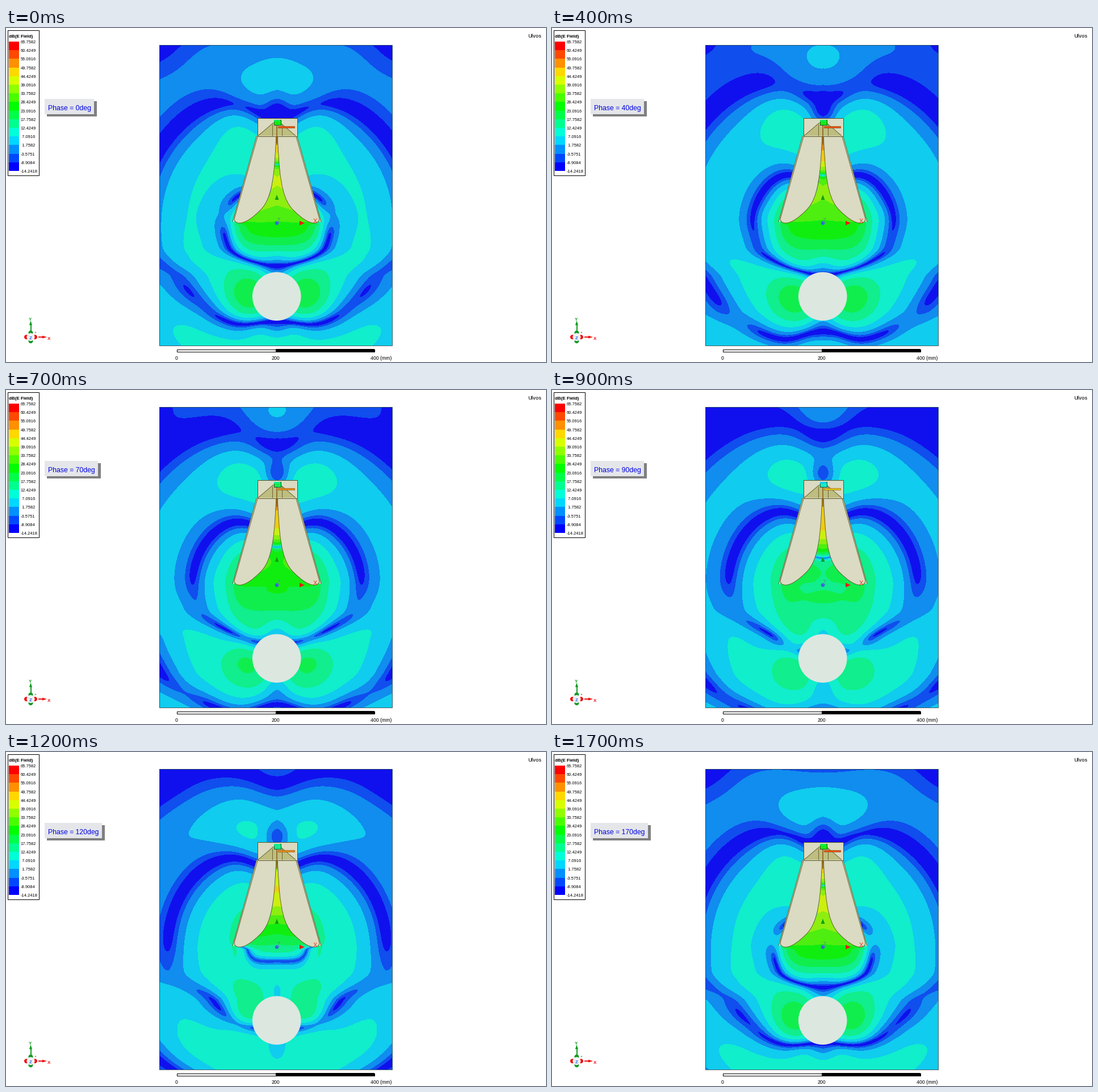
These frames come from a looping animation (951 by 589 pixels, 1800 ms). A matplotlib script:

```python
import numpy as np
import matplotlib.pyplot as plt
from matplotlib.animation import FuncAnimation
from matplotlib.patches import Circle, PathPatch, Polygon, Rectangle
from matplotlib.path import Path

W, H, DPI = 951, 589, 100
CX = 477                      # symmetry axis of the antenna
MOUTH = 340                   # height of the radiating mouth
BALL_Y, BALL_R = 473.3, 42.8
LEFT, RIGHT, TOP, BOTTOM = 270, 680, 30, 559
FRAMES, STEP = 18, 10         # phase step in degrees
V_MAX, V_STEP = 65.75823, 16 / 3
V_MIN = V_MAX - 15 * V_STEP

# Stepped rainbow, lowest level first.
k = np.arange(15)
BANDS = np.clip(72 * np.column_stack([k - 7, np.minimum(k, 14 - k), 7 - k]),
                0, 255)
SHADED = (16 + BANDS * 222 / 255).astype(np.uint8)

u, y = np.meshgrid(np.abs(np.arange(LEFT, RIGHT) - CX).astype(float),
                   np.arange(TOP, BOTTOM + 1.0))


def bump(u0, y0, su, sy):
    return np.exp(-((u - u0) / su) ** 2 / 2 - ((y - y0) / sy) ** 2 / 2)


def ramp(start, width):
    t = np.clip((y - start) / width, 0, 1)
    return t * t * (3 - 2 * t)


def zero_phase():
    """Phase at which the field passes through zero."""
    flat_u = u * (1 - np.exp(-(u / 60) ** 2))     # flat fronts in the mouth
    r = np.sqrt(flat_u ** 2 + (y - MOUTH) ** 2 + 30 ** 2)
    behind = np.tanh(np.maximum(MOUTH - y, 0) / 60)
    delay = 70 * behind * np.exp(-(u / 85) ** 2)
    delay += 52 * ramp(385 + 20 * np.exp(-(u / 40) ** 2), 55)
    delay += 35 * np.exp(-(u / 55) ** 2) * ramp(490, 50)
    delay += .3 * np.maximum(y - 500, 0)
    return 71 + 1.18 * r + delay


def peak_level():
    """Highest level in dB over one cycle."""
    r = np.sqrt(u ** 2 + (y - MOUTH) ** 2 + 30 ** 2)
    db = 16.5 - .058 * r + .045 * np.maximum(y - 400, 0)
    db += 13 * np.exp(-(u / 80) ** 6 - ((y - 345) / 48) ** 2)
    db += 5 * bump(65, 150, 40, 40) - 13 * bump(0, 148, 14, 16)  # back lobes
    db += 4 * bump(0, 35, 30, 30) - 5 * bump(210, 30, 35, 35)
    db += 11 * bump(52, 472, 28, 30)                             # ball sides
    return db - 7 * bump(0, 428, 18, 18) - 7 * bump(0, 522, 16, 16)


def null_fill():
    """Elliptic polarisation leaves a remainder in the nulls."""
    return (.0008 + .18 * bump(172, 396, 28, 28) + .1 * bump(62, 85, 25, 28)
            + .1 * bump(92, 332, 12, 12) + .1 * bump(155, 515, 22, 22)
            + .03 * bump(70, 458, 16, 16))


def blend_slot(peak, null, fill):
    """Inside the tapered slot the wave runs down along the axis."""
    inside = u < 4 + 65 * np.exp((y - 344) / 26)
    mix = np.clip((348 - y) / 12, 0, 1) * (inside & (y > 185))
    slot_peak = 54 - .165 * (y - .35 * u - 190)
    slot_null = 20 + 85 * np.tanh((y + .2 * u - 250) / 40)
    return (peak + mix * (slot_peak - peak), null + mix * (slot_null - null),
            fill + mix * (.0001 - fill))


PEAK, NULL, FILL = blend_slot(peak_level(), zero_phase(), null_fill())


def level(phase, top, zero, floor):
    s = np.sin(np.radians(phase - zero))
    return top + 10 * np.log10(s * s + floor)


def shade(db):
    return SHADED[np.clip(np.floor((db - V_MIN) / V_STEP), 0, 14).astype(int)]


def field(phase):
    return shade(level(phase, PEAK, NULL, FILL))


fig = plt.figure(figsize=(W / DPI, H / DPI), dpi=DPI, facecolor="white")
ax = fig.add_axes([0, 0, 1, 1])


def label(x, y, text, px, color="black", **kw):
    return ax.text(x, y, text, fontsize=px * 72 / DPI, color=color,
                   family="Liberation Sans", zorder=9, **kw)


def rect(x0, y0, x1, y1, fc, ec="none", lw=.72, z=3):
    return ax.add_patch(Rectangle((x0, y0), x1 - x0, y1 - y0, fc=fc, ec=ec,
                                  lw=lw, zorder=z))


def line(xs, ys, color, lw=.72, z=5):
    ax.plot(xs, ys, color=color, lw=lw, zorder=z, solid_capstyle="butt")


def dot(x, y, r, color, z=7):
    ax.add_patch(Circle((x, y), r, fc=color, ec="none", zorder=z))


def poly(pts, fc, z=7):
    ax.add_patch(Polygon(pts, fc=fc, ec="none", zorder=z))


def draw_legend():
    rect(2.5, 3.5, 57.5, 259.5, "white", "black")
    label(5, 17, "dB(E Field)", 8, weight="bold")
    for i in range(16):
        y0 = 24 + 15.2 * i
        if i < 15:
            rect(5, y0, 23, y0 + 15.2, BANDS[14 - i] / 255, z=4)
        label(25.5, y0 + 3, f"{V_MAX - i * V_STEP:7.4f}", 7.5)


def draw_antenna():
    body, dark, edge = "#dadbc2", "#bebe80", "#5a5423"
    codes = [Path.MOVETO] + [Path.CURVE4] * 9 + [Path.LINETO, Path.CLOSEPOLY]
    half = np.array([(1.2, 190), (4, 250), (6, 300), (30, 322), (42, 334),
                     (55, 344), (66, 344), (71, 344), (76, 341), (74.5, 335),
                     (33.5, 190), (1.2, 190)])
    for s in (-1, 1):
        poly([(CX + s * a, b) for a, b in
              ((33, 190), (35.5, 190), (78, 342), (75, 342))], body, 4)
        outline = np.column_stack([CX + s * half[:, 0], half[:, 1]])
        ax.add_patch(PathPatch(Path(outline, codes), fc=body, ec=edge,
                               lw=.6, zorder=5))
        line([CX + s * 35.5, CX + s * 78], [190, 342], edge, .6)
    rect(442.5, 158.5, 512.5, 190.5, body, edge, z=5)
    poly([(444, 190), (471, 167), (483, 167), (510, 190)], dark, 5)
    line([444, 471], [190, 167], edge, .6, 6)
    line([483, 510], [167, 190], edge, .6, 6)
    for x in (468.5, 485.5):
        line([x, x], [170, 190], edge, .6, 6)
    line([476.5, 476.5], [171, 206], "#8a5a14", 1.1, 6)


def draw_axes_marks():
    dot(477, 344, 3.3, "#3c64dc")
    label(477, 343, "Z", 10, "#5a8c8c")
    poly([(477, 294), (473.5, 303), (480.5, 303)], "#12a012")
    poly([(526, 344), (517, 340), (517, 348)], "#e61e14")
    label(541, 344, "X", 11, "#e63c1e")

    green, red = "#109a20", "#f01414"
    line([43.5, 43.5], [537, 522], green, 1.4)
    poly([(43.5, 516), (41, 524), (46, 524)], green)
    for y0 in (537.5, 552):
        dot(43.5, y0, 4, green)
    for x0 in (36, 51):
        dot(x0, 545, 4, red)
    line([57, 66], [545, 545], red, 1.4)
    poly([(72, 545), (64, 542.5), (64, 547.5)], red)
    dot(43.5, 545, 7, "#eef2f4", 8)
    dot(52, 537, 1.3, "#9aa89a", 8)
    label(43.3, 549, "Z", 8, "#2864e6", ha="center", weight="bold")
    label(43, 516, "Y", 8, green, ha="center", weight="bold")
    label(76, 549.5, "X", 8, red, ha="center", weight="bold")


def draw_scale():
    rect(300.5, 566.5, 648.5, 570.5, "white", "black")
    rect(475, 566, 649, 571, "black", z=4)
    for x, text in ((300.5, "0"), (474.5, "200"), (660.5, "400 (mm)")):
        label(x, 585, text, 8.8, ha="center")


image = ax.imshow(field(0), extent=(LEFT, RIGHT, BOTTOM + 1, TOP),
                  interpolation="nearest", zorder=1)
rect(LEFT - .5, TOP - .5, RIGHT - .5, BOTTOM + .5, "none", "#1e4650", .6, 2)
draw_legend()
draw_antenna()
dot(CX - .3, BALL_Y, BALL_R, "#dce7e0", 5)
draw_axes_marks()
draw_scale()
label(943, 17, "Ulvos", 8.8, "#3c3c3c", weight="bold", ha="right")

feed = rect(471.5, 161.5, 483.5, 170.5, "lime", "#285028", z=7)
feed_top = rect(472, 162, 483, 164.5, "lime", z=8)
probe = rect(478.5, 172.5, 507.5, 175.5, "red", "#8c5a1e", .5, 7)
shadow = rect(72, 129, 160, 156, "#808080", z=3)
plate = rect(68, 125, 156, 152, "#e4e6ea", z=4)
caption = label(73.5, 145, "", 12.3, "#0000e0")

ax.set_xlim(0, W)
ax.set_ylim(H, 0)
ax.set_aspect("auto")
ax.axis("off")


def update(i):
    phase = i * STEP
    image.set_data(field(phase))
    width = 80.5 + 6.9 * len(str(phase))
    plate.set_width(width)
    shadow.set_width(width + .5)
    caption.set_text(f"Phase = {phase}deg")
    feed.set_facecolor(shade(level(phase, 26, 100, 1e-4)) / 255)
    feed_top.set_facecolor(shade(level(phase, 22, 100, 1e-4)) / 255)
    probe.set_facecolor(shade(level(phase, 59.5, 97, .03)) / 255)
    return image, plate, shadow, caption, feed, feed_top, probe


anim = FuncAnimation(fig, update, frames=FRAMES, interval=100, repeat=True,
                     repeat_delay=0, blit=False)
plt.show()
```
